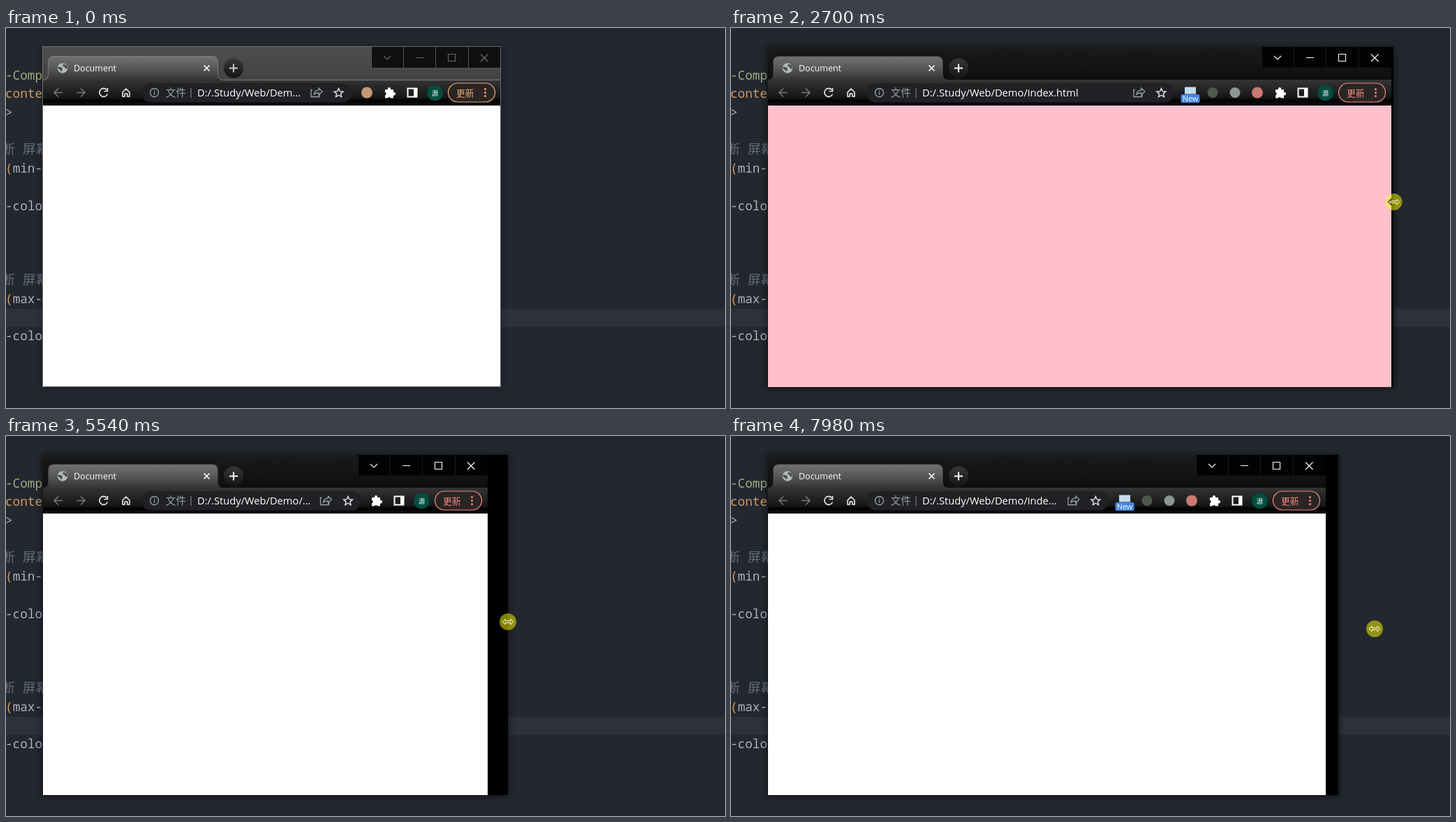
Write an HTML page that moves like this. It is 1030x544 px and loops after 8000 ms.

```html
<!DOCTYPE html>
<html lang="zh">
<head>
<meta charset="utf-8">
<title>Document</title>
<style>
  html, body { margin: 0; height: 100%; overflow: hidden; background: #23272e; }
  svg { display: block; width: 100vw; height: 100vh;
    --bar: url(#barIdle); --line: #7c7c7c; --accent: #eaa877; --button: #101010; --frame: #6c6c6c;
    --divider: #555; --glyph: #6d6d6d; --plus: #c8cac8; --face: #c39a78; --shade: .3; }
  svg.active { --bar: url(#barActive); --line: #343434; --accent: #f28b82; --button: #030303; --frame: none;
    --divider: #191919; --glyph: #fff; --plus: #fff; --face: #c97a72; --shade: .6; }
  text { white-space: pre; }
  .code { font: 17.7px "Noto Sans Mono", "Noto Sans CJK SC", monospace; fill: #abb2bf; }
  .code .note { fill: #626d79; font-size: 18.7px; }
  .code .key { fill: #d19a66; }
  .ui { font: 14.7px "Open Sans", "Noto Sans CJK SC", "Noto Sans CJK", sans-serif; fill: #fff; }
  .icon { fill: none; stroke: #e8eaed; stroke-width: 1.6; }
  .dim { stroke: #777; }
  .grey { stroke: #9aa0a6; stroke-width: 1.3; }
  .control { fill: none; stroke: var(--glyph); stroke-width: 1.1; }
</style>
</head>
<body>
<svg id="stage" viewBox="0 0 1030 544" preserveAspectRatio="none">
  <defs>
    <linearGradient id="barIdle" x2="0" y2="1"><stop stop-color="#4e4e4e"/><stop offset="1" stop-color="#434343"/></linearGradient>
    <linearGradient id="barActive" x2="0" y2="1"><stop stop-color="#1b1b1b"/><stop offset="1" stop-color="#0e0e0e"/></linearGradient>
    <linearGradient id="tabFill" x2="0" y2="1"><stop stop-color="#707272"/><stop offset=".45" stop-color="#5a5b5b"/><stop offset="1" stop-color="#343434"/></linearGradient>
    <linearGradient id="toolFill" x2="0" y2="1"><stop stop-color="#343434"/><stop offset=".72" stop-color="#141414"/><stop offset=".73" stop-color="#020202"/><stop offset="1" stop-color="#0c0c0c"/></linearGradient>
    <linearGradient id="plusFill" x2="0" y2="1"><stop stop-color="#383838"/><stop offset="1" stop-color="#141414"/></linearGradient>
    <filter id="blur" x="-10%" y="-10%" width="120%" height="120%"><feGaussianBlur stdDeviation="5"/></filter>
    <clipPath id="overPage"><rect id="pageClip" height="544"/></clipPath>
    <path id="resize" d="M-8 0l4-4v2.7h8v-2.7l4 4-4 4v-2.7h-8v2.7z" fill="none"/>
  </defs>

  <rect width="1030" height="544" fill="#23272e"/>
  <rect y="402" width="1030" height="26" fill="#2c313c"/>
  <g class="code">
    <text x="-1" y="74" style="fill:#a3ad80">-Comp</text>
    <text x="-1" y="100" class="key">conte</text>
    <text x="-1" y="127">&gt;</text>
    <text class="note" x="-6" y="180">断</text><text class="note" x="24" y="180">屏幕</text>
    <text x="-1" y="207"><tspan class="key">(</tspan>min-</text>
    <text x="-1" y="261">-colo</text>
    <text class="note" x="-6" y="367">断</text><text class="note" x="24" y="367">屏幕</text>
    <text x="559" y="367" style="fill:#6c6d6c">*/</text>
    <text x="-1" y="394"><tspan class="key">(</tspan>max-</text>
    <text x="-1" y="447">-colo</text>
  </g>

  <rect id="shadow" x="52" y="28" height="487" filter="url(#blur)" style="opacity:var(--shade)"/>
  <rect id="strip" x="53" y="27" height="487"/>
  <rect id="titleBar" x="53" y="27" height="47" style="fill:var(--bar)"/>
  <rect id="toolbar" x="53" y="74" height="38" fill="url(#toolFill)"/>
  <rect id="page" x="53" y="111" height="403"/>

  <path id="tab" fill="url(#tabFill)"/>
  <path id="tabLine" fill="none" style="stroke:var(--line)"/>
  <g transform="translate(81 57.5)">
    <circle r="7.2" fill="#b4b8b8"/>
    <path d="M-6-2l5 1 1 3-2 3-2-3-3-2zM1-6l-1 3 3 1 1 3 3-1-1-4z" fill="#4b4d4d"/>
  </g>
  <text class="ui" x="97" y="62" style="font-size:12.5px;font-weight:500">Document</text>
  <g id="tabEnd">
    <path class="icon" d="M-20-4l8 8m0-8l-8 8" style="stroke:#fff"/>
    <circle cx="22.5" r="14" fill="url(#plusFill)"/>
    <path d="M16.5 0h12m-6-6v12" stroke-width="2" style="stroke:var(--plus)"/>
  </g>

  <path class="icon dim" d="M81 92.5h-12m6-6l-6 6 6 6M101 92.5h12m-6-6l6 6-6 6"/>
  <path class="icon" d="M144.5 88.5a6 6 0 1 0 1 6M145.5 86v4.500h-5"/>
  <path class="icon" d="M167 92l5-4.800 5 4.800v6h-3.200v-4h-3.600v4h-3.200z"/>

  <rect id="omnibox" x="194" y="79" height="27.5" rx="13.7" fill="#202124"/>
  <circle class="icon grey" cx="212.5" cy="92.5" r="6"/>
  <path class="icon grey" d="M212.5 91.5v4m0-6.500v1.400"/>
  <text class="ui" x="228.5" y="98" style="fill:#9aa0a6">文件</text>
  <path d="M265 86v14" stroke="#8a8d91"/>
  <text class="ui" id="address" x="274" y="98"></text>
  <g id="omniEnd">
    <path class="icon grey" d="M-56-4h-2v10h12v-3M-54 2.500q1-6 7-6v-3l5 5-5 5v-3q-5 0-7 2z"/>
    <path class="icon" style="stroke-width:1.4" d="M-18.500-6l1.800 4.200 4.600.4-3.500 3 1.100 4.500-4-2.400-4 2.400 1.100-4.500-3.500-3 4.600-.4z"/>
  </g>

  <g id="extensions">
    <circle r="8" style="fill:var(--face)"/>
    <circle r="7.5" fill="#8b9793"/>
    <circle r="7.5" fill="#4e5a49"/>
    <g>
      <rect x="-8" y="-8" width="16" height="10" fill="#c4dcee"/>
      <rect x="-13.5" y="2.5" width="27" height="12" rx="2" fill="#4184e4"/>
      <text class="ui" y="12" text-anchor="middle" style="font-size:10.8px">New</text>
    </g>
  </g>

  <g id="rightEnd">
    <rect x="-186" y="27" width="186" height="30.5" style="fill:var(--button)"/>
    <path d="M-185.5 27v30.500M-139.500 27v30.500M-93.500 27v30.500M-46.500 27v30.500M-185.500 57.500H0" fill="none" style="stroke:var(--divider)"/>
    <path class="control" d="M-168 40l5 5 5-5M-122 42.500h11M-75.500 37.500h10v10h-10zM-29 37.500l10.500 10.500m0-10.500l-10.500 10.500"/>
    <path fill="#fff" d="M-166 88h4a2.200 2.200 0 1 1 4 0h4v4a2.300 2.300 0 1 1 0 4.300v4h-4a2.200 2.200 0 0 0-4 0h-4v-4a2.200 2.200 0 0 0 0-4.300z"/>
    <path fill="#fff" fill-rule="evenodd" d="M-134.500 85.500h15v14h-15zm2 2v10h7.500v-10z"/>
    <circle cx="-94.5" cy="93" r="11.3" fill="#004d40"/>
    <text class="ui" x="-94.5" y="96.5" text-anchor="middle" style="font-size:9.5px">源</text>
    <rect x="-75.5" y="79" width="67" height="27" rx="13.5" fill="#2a2524" style="stroke:var(--accent)" stroke-width="1.2"/>
    <text class="ui" x="-64" y="97.5" style="font-size:12.8px;fill:var(--accent)">更新</text>
    <path d="M-22.500 87.500h0m0 5h0m0 5h0" stroke-width="3" stroke-linecap="round" style="stroke:var(--accent)"/>
  </g>
  <rect id="frame" x="52.5" y="26.5" height="487" fill="none" style="stroke:var(--frame)"/>

  <circle id="press" r="12" fill="#ff0" opacity=".5"/>
  <use class="resize" href="#resize" stroke="#fffbd8"/>
  <g clip-path="url(#overPage)"><use class="resize" href="#resize" stroke="#3d3d3d" stroke-width="1.3"/></g>
  <path id="arrow" d="M.5.5v14.500l3.400-3.300 2.400 5 2.300-1-2.400-5h4.600z" fill="#fff" stroke="#000"/>
</svg>

<script>
const LOOP = 8000, FIRST_TICK = 570, TICK = 1000 / 15, PRESS = 1870;
const LEFT = 53, MIN_RIGHT = 559, START_RIGHT = 709;
const GRAB_TICK = 12, DRAG_TICK = 19;
const ADDRESS = 'D:/.Study/Web/Demo/index.html';

const easeIn = power => f => f ** power;
const easeOut = power => f => 1 - (1 - f) ** power;
const smooth = f => f * f * (3 - 2 * f);

// Pointer strokes in screen updates; the pointer rests between them
const strokes = [
  { from: 0, to: 12, x: 699, y: 255, ease: easeOut(1.5) },
  { from: 12, to: 13, x: 709, y: 256, ease: smooth },
  { from: 19, to: 30, x: 949.5, y: 249, ease: easeOut(1.8) },
  { from: 37, to: 57, x: 530, y: 273, ease: easeOut(1.5) },
  { from: 64, to: 73, x: 719, y: 266, ease: easeIn(1.4) },
  { from: 75, to: 82, x: 620, y: 270, ease: smooth },
  { from: 82, to: 90, x: 769, y: 273, ease: easeOut(1.5) },
  { from: 90, to: 99, x: 992, y: 276, ease: smooth },
  { from: 100, to: 104, x: 852.8, y: 276, ease: easeIn(2) },
  { from: 109, to: 111, x: 922, y: 276, ease: easeIn(2) }];

const $ = id => document.getElementById(id);
const set = (el, attrs) => { for (const k in attrs) el.setAttribute(k, attrs[k]); };
const move = (el, x, y) => set(el, { transform: `translate(${x} ${y})` });
const show = (el, on) => { el.style.display = on ? '' : 'none'; };
const resizers = document.querySelectorAll('.resize');
const icons = [...$('extensions').children];
const pen = document.createElement('canvas').getContext('2d');
pen.font = '14.7px "Open Sans", sans-serif';

function pointerAt(tick) {
  let x = 974, y = 530;
  for (const s of strokes) {
    if (tick <= s.from) break;
    const f = s.ease(Math.min(1, (tick - s.from) / (s.to - s.from)));
    x += (s.x - x) * f;
    y += (s.y - y) * f;
  }
  return [x, y];
}

// The window frame trails the pointer by one update, its contents by two
const draggedEdge = tick =>
  tick < DRAG_TICK ? START_RIGHT : Math.max(MIN_RIGHT, Math.floor(pointerAt(tick)[0]));
const frameRight = tick => draggedEdge(tick - 1);
const pageRight = tick => Math.min(frameRight(tick), draggedEdge(tick - 2));

const iconRoom = right => Math.max(0, Math.min(icons.length, Math.floor((right - 675.5) / 32)));

function fitAddress(room) {
  const width = text => pen.measureText(text).width;
  if (width(ADDRESS) <= room) return ADDRESS;
  let n = ADDRESS.length;
  while (n > 3 && width(ADDRESS.slice(0, n) + '...') > room) n--;
  return ADDRESS.slice(0, n) + '...';
}

function drawWindow(right, edge, iconCount) {
  for (const id of ['titleBar', 'toolbar', 'page']) set($(id), { width: right - LEFT });
  for (const id of ['strip', 'frame']) set($(id), { width: edge - LEFT });
  set($('shadow'), { width: edge - LEFT + 2 });
  set($('page'), { fill: right <= 653 ? '#ff0' : right >= 860 ? '#ffc0cb' : '#fff' });
  set($('pageClip'), { width: right });

  const end = Math.min(303.5, right - 272);
  const outline = `M53 74.5q7.5 0 7.5-8V48.5q0-8 8-8H${end - 8}q8 0 8 8v18q0 8 8 8`;
  set($('tab'), { d: outline });
  set($('tabLine'), { d: `${outline}H${right}` });
  move($('tabEnd'), end, 57.5);

  const omni = right - 181.5 - 32.4 * iconCount;
  set($('omnibox'), { width: omni - 194 });
  move($('omniEnd'), omni, 92.5);
  $('address').textContent = fitAddress(omni - 69 - 274);

  const slots = Math.ceil(iconCount);
  icons.forEach((icon, i) => {
    show(icon, i < slots);
    if (i < slots) move(icon, right - 160 - 32 * (i + 1) * iconCount / slots, 92.5);
  });
  move($('rightEnd'), right, 0);
}

function render(t) {
  const tick = Math.floor((t - FIRST_TICK) / TICK);
  const pressed = t >= PRESS;
  const resizing = tick > GRAB_TICK;
  $('stage').classList.toggle('active', pressed);

  const right = pageRight(tick);
  const iconCount = 0.6 * iconRoom(right) + 0.4 * iconRoom(pageRight(tick - 1));
  drawWindow(right, frameRight(tick), iconCount);

  const [x, y] = pointerAt(tick);
  show($('arrow'), tick >= 0 && !resizing);
  show($('press'), pressed);
  move($('arrow'), x, y);
  move($('press'), x, y);
  resizers.forEach(el => { show(el, resizing); move(el, x, y); });
}

const start = performance.now();
function frame() {
  render((performance.now() - start) % LOOP);
  requestAnimationFrame(frame);
}
frame();
</script>
</body>
</html>
```
